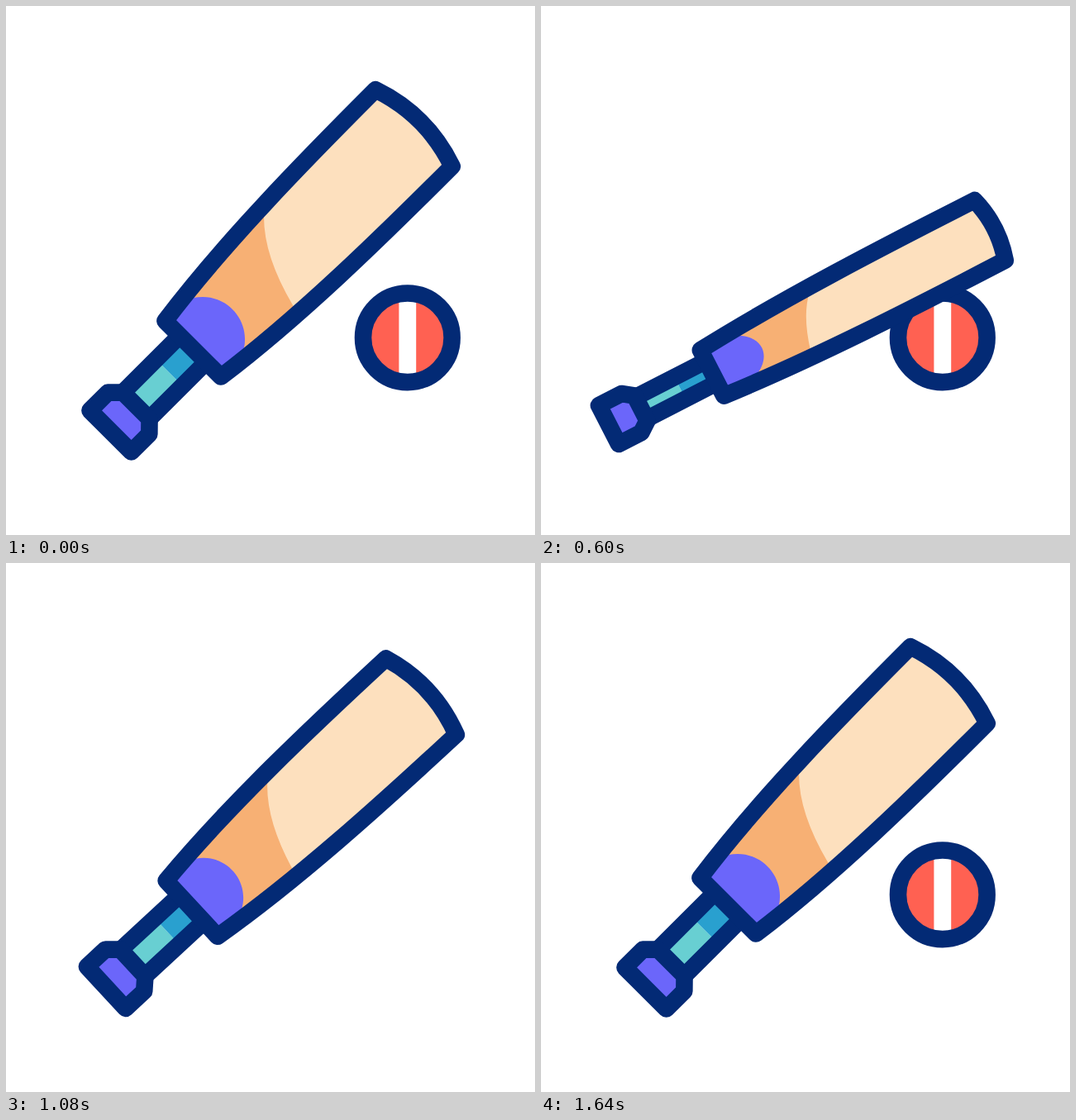
An HTML page that plays this animation: 640 px wide and 640 px high, repeating every 1.84 s.

```html
<!DOCTYPE html>
<html lang="en">
<head>
<meta charset="utf-8">
<title>Cricket bat and ball</title>
<style>
html, body { margin: 0; width: 100%; height: 100%; overflow: hidden; background: #fff; }
svg { display: block; width: 100vw; height: 100vh; }
.line { stroke: #032a75; stroke-width: 20.6; stroke-linejoin: round; }
</style>
</head>
<body>
<svg viewBox="0 0 640 640">
  <g id="ball">
    <circle r="53.8" fill="#ff6152"/>
    <rect x="-10.4" y="-50" width="20.8" height="100" fill="#fff"/>
    <circle r="53.8" fill="none" class="line"/>
  </g>
  <g id="bat">
    <path id="grip" fill="#68cfd2"/>
    <path id="gripTop" fill="#29a0cf"/>
    <path id="gripLine" fill="none" class="line"/>
    <path id="knob" fill="#6b66fa" class="line"/>
    <path id="wood" fill="#fde0be"/>
    <path id="shade" fill="#f7b074"/>
    <path id="heel" fill="#6b66fa"/>
    <path id="bladeLine" fill="none" class="line"/>
  </g>
</svg>
<script>
const LOOP = 1840, STEP = 40;
const PIVOT = [143.5, 497.5], BALL = [485.8, 401.3];
const el = id => document.getElementById(id);
const draw = (id, d) => el(id).setAttribute('d', d);
const span = (t, a, b) => Math.min(1, Math.max(0, (t - a) / (b - a)));
const smooth = x => x * x * (3 - 2 * x);
const cubic = x => x < .5 ? 4 * x ** 3 : 1 - 4 * (1 - x) ** 3;

// Bat outline: x runs along the axis, y across it; m is how far it turns edge-on.
function shapeBat(m) {
  const g = 22.6 * (1 - .9 * m), k = 1 - .67 * m;
  // Blade point: narrows a little more towards the tip and drifts sideways.
  const p = (x, y) => {
    const w = 1 - m * (.89 + .0002 * x);
    return `${(x - 3 * m).toFixed(2)} ${(y * w + 4 * m).toFixed(2)} `;
  };

  const split = 76.4 - 9 * m;
  draw('grip', `M20 ${-g}H${split}V${g}H20Z`);
  draw('gripTop', `M${split} ${-g}H115V${g}H${split}Z`);
  draw('gripLine', `M20 ${-g}H115M20 ${g}H115`);

  const a = 35.5 * k, b = 22.7 * k;
  draw('knob', `M-24 ${-a}H6.7L19.8 ${-b}V${b}L6.7 ${a}H-24Z`);

  const bulge = 22.5 * (1 - 1.2 * m);
  const blade = 'M' + p(117, -47.8) +
    'C' + p(235, -64) + p(370, -65.5) + p(494.8, -65.5) +
    'Q' + p(494.8 + bulge, 0) + p(494.8, 65.5) +
    'C' + p(370, 65.5) + p(235, 64) + p(117, 47.8) + 'Z';
  draw('wood', blade);
  draw('bladeLine', blade);

  const edge = (x, y) => p(265 * (1 - .14 * m) + (x - 265) * (1 - m), y);
  draw('shade', 'M' + p(117, -47.8) + 'L' + p(200, -58) + 'L' + edge(297.7, -59.4) +
    'L' + edge(290.6, -52.3) + 'Q' + edge(256.7, -18.4) + edge(239.7, 48.1) +
    'L' + edge(236.9, 59.4) + 'L' + p(200, 58) + 'L' + p(117, 47.8) + 'Z');

  draw('heel', 'M' + p(117, -47.8) + 'L' + p(154, -50) + 'L' + p(161.2, -43) +
    'C' + p(192.3, -23) + p(192.3, 23) + p(161.2, 43) +
    'L' + p(154, 50) + 'L' + p(117, 47.8) + 'Z');
}

function render(t) {
  const lift = smooth(span(t, 80, 425));
  const hit = cubic(span(t, 425, 685));
  const back = cubic(span(t, 690, 1240));
  const m = .445 * hit * (1 - back);
  const turn = (-12.35 * lift + 35.05 * hit) * (1 - back);
  shapeBat(m);
  el('bat').setAttribute('transform',
    `translate(${PIVOT[0] - 105 * m} ${PIVOT[1] - 5 * m}) rotate(${turn - 45})`);

  let [x, y] = BALL, roll = 0;
  if (t < 1200) {
    y += 1.6 * Math.max(0, t - 605);
  } else {
    const left = (1 - span(t, 1200, 1640)) ** 2;
    x += 270 * left;
    roll = 180 * left;
  }
  el('ball').setAttribute('transform', `translate(${x} ${y}) rotate(${roll})`);
}

const start = performance.now();
function tick() {
  const t = (performance.now() - start) % LOOP;
  render(Math.floor(t / STEP) * STEP);
  requestAnimationFrame(tick);
}
tick();
</script>
</body>
</html>
```
